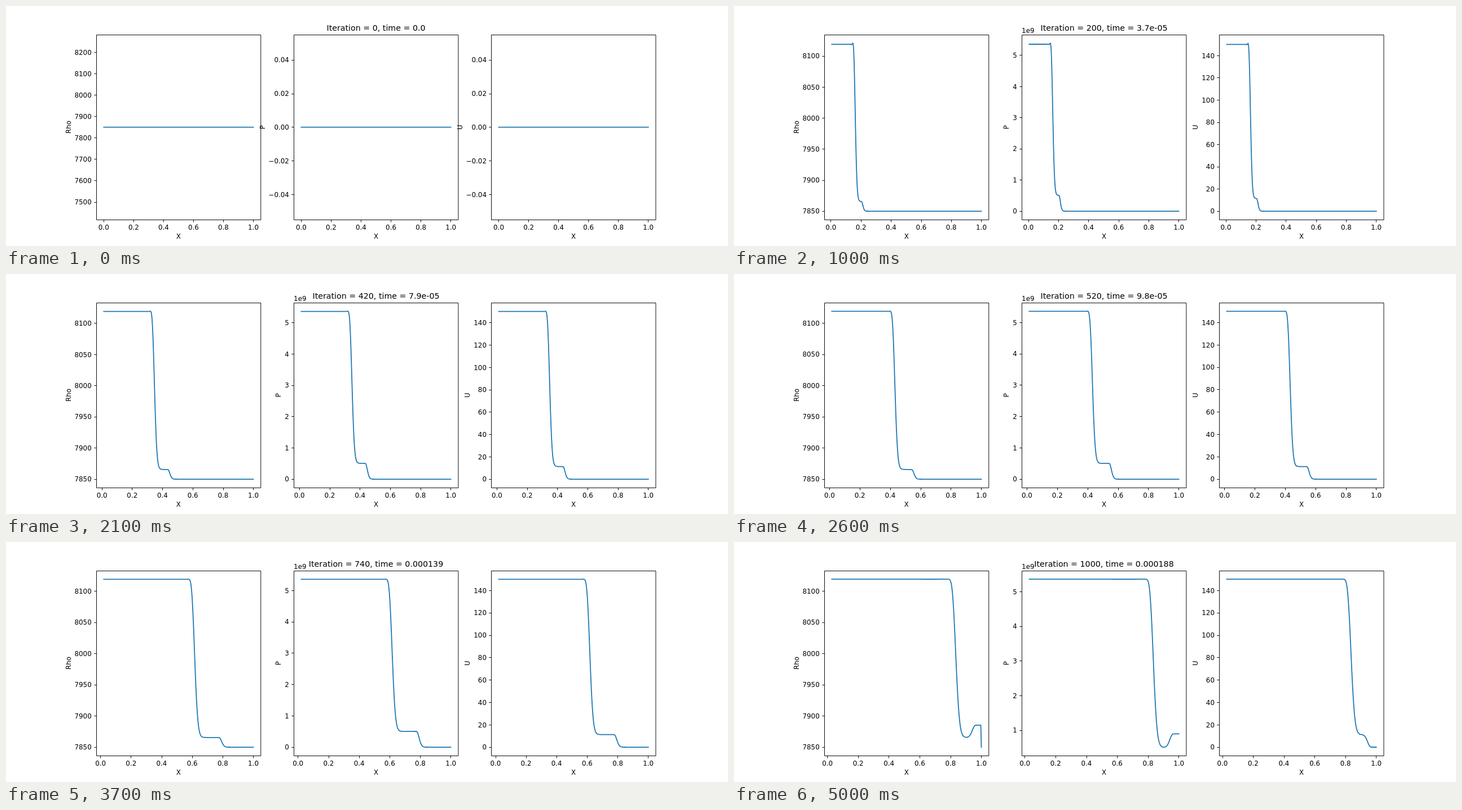
These frames come from a looping animation (1280x427 px, 5.1 s). An HTML page:

```html
<!DOCTYPE html>
<html lang="en">
<head>
<meta charset="utf-8">
<title>Elastic-plastic wave</title>
<style>
html, body { margin: 0; width: 100%; height: 100%; overflow: hidden; background: #fff; }
svg { display: block; width: 100vw; height: 100vh; }
text { font: 11.85px "DejaVu Sans", Verdana, sans-serif; fill: #000; }
.title { font-size: 14.22px; }
.mid { text-anchor: middle; }
.end { text-anchor: end; }
.axis { fill: none; stroke: #000; stroke-width: 0.95; }
.curve { fill: none; stroke: #1f77b4; stroke-width: 1.78; stroke-linejoin: round; stroke-linecap: square; }
</style>
</head>
<body>
<svg id="stage" viewBox="0 0 1280 427"></svg>
<script>
const FRAMES = 51, FRAME_MS = 100, STEPS = 20;

// Material and mesh: a piston drives an elastic precursor and a plastic wave
const CELLS = 300, DX = 1 / CELLS, RHO0 = 7850, PISTON = 150;
const C_PLASTIC = 4454, C_ELASTIC = 5719;
const BULK = RHO0 * C_PLASTIC ** 2;
const SHEAR = RHO0 * C_ELASTIC ** 2 - BULK;
const YIELD = 0.197e9;
const VISC_PLASTIC = 4e-4 / DX * RHO0 * C_PLASTIC;
const VISC_ELASTIC = VISC_PLASTIC / 4;

function simulate() {
  const x = Array.from({ length: CELLS + 1 }, (_, i) => i * DX);
  const u = new Array(CELLS + 1).fill(0);
  const rho = new Array(CELLS + 1).fill(RHO0);
  const sigma = new Array(CELLS).fill(0);
  const force = new Array(CELLS).fill(0);
  const frames = [];
  let time = 0;
  for (let n = 0; n <= (FRAMES - 1) * STEPS; n++) {
    if (n % STEPS === 0) {
      frames.push({ n, time, x: x.slice(), data: [rho.slice(), [...sigma, sigma[CELLS - 1]], u.slice()] });
    }
    const dt = n < 10 ? 1.385e-7 : 1.885e-7;
    time += dt;
    u[0] = PISTON;
    for (let i = 1; i < CELLS; i++) u[i] += dt * (force[i - 1] - force[i]) / (RHO0 * DX);
    for (let i = 0; i <= CELLS; i++) x[i] += dt * u[i];
    for (let i = 0; i < CELLS; i++) {
      const strain = 1 - (x[i + 1] - x[i]) / DX;
      const shear = SHEAR * strain;
      const visc = shear > YIELD ? VISC_PLASTIC : VISC_ELASTIC;
      sigma[i] = BULK * strain + Math.max(-YIELD, Math.min(YIELD, shear));
      force[i] = sigma[i] + visc * (u[i] - u[i + 1]);
      rho[i] = RHO0 / (1 - strain);
    }
  }
  return frames;
}

// Layout
const TOP = 51.24, BOTTOM = 379.96, WIDTH = 291.76, PITCH = 350.12, LEFT = 160;
const TICK = 4.15, LABEL_GAP = 8.3;
const NAMES = ["Rho", "P", "U"];
const snap = v => Math.floor(v + 0.2) + 0.5;
const text = (s, x, y, cls = "mid", more = "") =>
  `<text x="${x.toFixed(2)}" y="${y.toFixed(2)}" class="${cls}" ${more}>${s}</text>`;

function limits(values) {
  let lo = Math.min(...values), hi = Math.max(...values);
  if (hi - lo < 1e-9) {
    const pad = Math.abs(lo) * 0.05 || 0.05;
    lo -= pad;
    hi += pad;
  }
  const margin = (hi - lo) * 0.05;
  return [lo - margin, hi + margin];
}

function ticks([lo, hi], bins) {
  const raw = (hi - lo) / bins;
  const unit = 10 ** Math.floor(Math.log10(raw));
  const step = unit * [1, 2, 2.5, 5, 10].find(s => s * unit >= raw * 0.99999);
  const digits = step >= 1 ? 0 : Math.ceil(-Math.log10(step));
  const list = [];
  for (let k = Math.ceil(lo / step); k * step <= hi; k++) {
    const value = k * step;
    list.push({ value, label: value.toFixed(digits).replace(/^-/, "\u2212") });
  }
  return list;
}

const labelWidth = s => 11.85 * [...s].reduce(
  (w, c) => w + (c === "." ? 0.318 : c === "\u2212" ? 0.838 : 0.636), 0);

function panel(frame, p) {
  const left = LEFT + p * PITCH, right = left + WIDTH;
  const big = p === 1 && frame.n > 0;
  const ys = big ? frame.data[p].map(v => v / 1e9) : frame.data[p];
  const xLim = limits(frame.x), yLim = limits(ys);
  const px = v => left + (v - xLim[0]) / (xLim[1] - xLim[0]) * WIDTH;
  const py = v => BOTTOM - (v - yLim[0]) / (yLim[1] - yLim[0]) * (BOTTOM - TOP);
  const l = snap(left), t = snap(TOP), b = snap(BOTTOM);

  let axis = `M${l} ${t}H${right}V${b}H${l}Z`, out = "", widest = 0;
  for (const { value, label } of ticks(xLim, 8)) {
    axis += `M${snap(px(value))} ${b}v${TICK}`;
    out += text(label, px(value), 398);
  }
  for (const { value, label } of ticks(yLim, 9)) {
    axis += `M${l} ${snap(py(value))}h${-TICK}`;
    out += text(label, left - LABEL_GAP, py(value) + 4.4, "end");
    widest = Math.max(widest, labelWidth(label));
  }
  const curve = ys.map((v, i) => px(frame.x[i]).toFixed(2) + "," + py(v).toFixed(2)).join(" ");
  const nameX = left - LABEL_GAP - widest - 6.9, midY = (TOP + BOTTOM) / 2;
  out += text("X", (left + right) / 2, 414.3);
  out += text(NAMES[p], nameX, midY, "mid", `transform="rotate(-90 ${nameX.toFixed(2)} ${midY})"`);
  if (big) out += text("1e9", left, 47.7, "");
  return `<polyline class="curve" points="${curve}"/><path class="axis" d="${axis}"/>` + out;
}

function timeLabel(seconds) {
  const micro = Math.round(seconds * 1e6);
  if (micro === 0) return "0.0";
  if (micro < 10) return micro + "e-06";
  if (micro < 100) return micro / 10 + "e-05";
  return String(micro / 1e6);
}

const scenes = simulate().map(f =>
  [0, 1, 2].map(p => panel(f, p)).join("") +
  text(`Iteration = ${f.n}, time = ${timeLabel(f.time)}`, 656, 44.2, "mid title"));

const stage = document.getElementById("stage");
const start = performance.now();
let shown = -1;

function draw() {
  const k = Math.floor(Math.max(0, performance.now() - start) / FRAME_MS) % FRAMES;
  if (k !== shown) {
    stage.innerHTML = scenes[k];
    shown = k;
  }
  requestAnimationFrame(draw);
}
draw();
</script>
</body>
</html>
```
